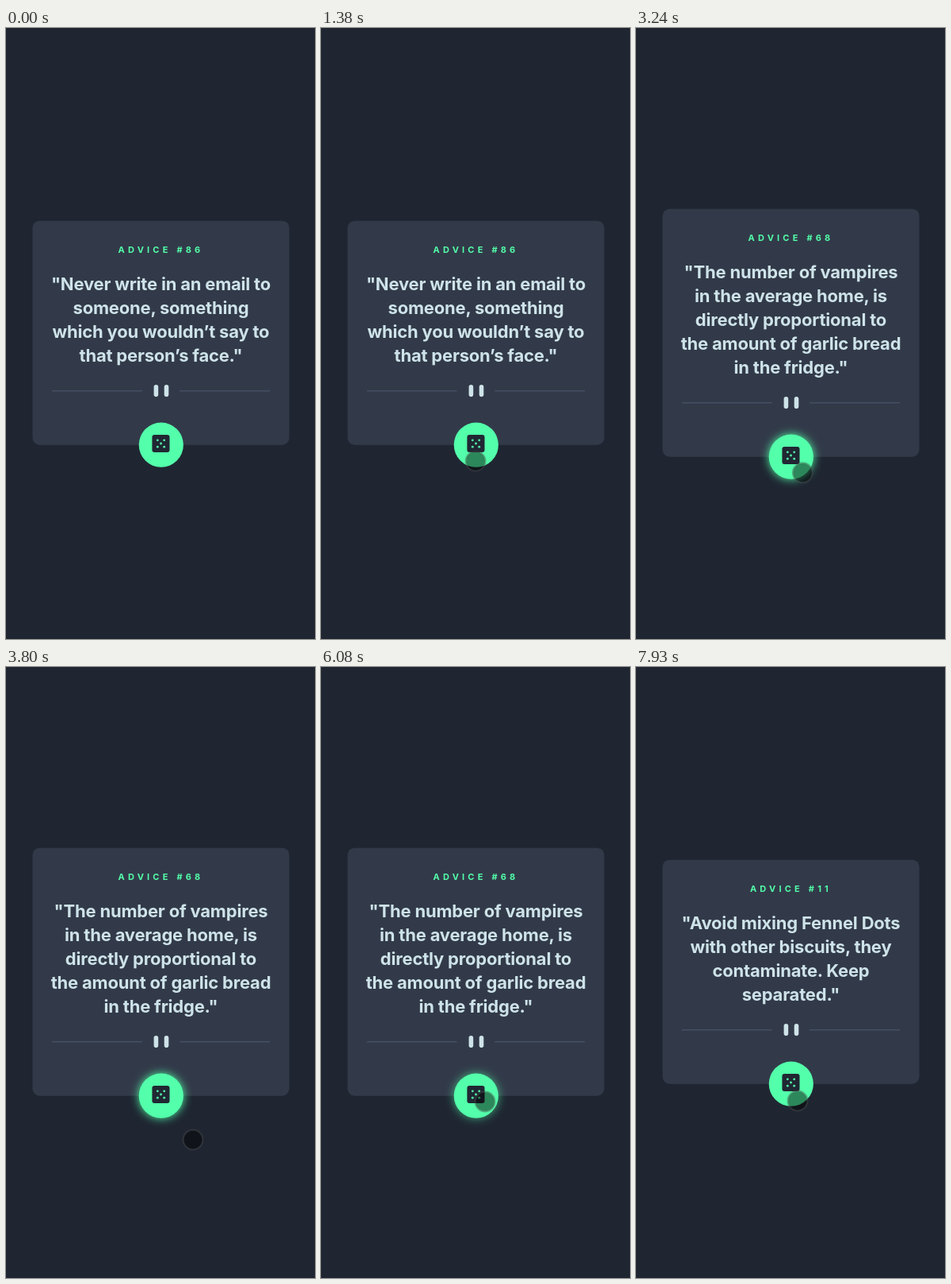
Write an HTML page that moves like this. It is 390 by 769 pixels and loops after 7990 ms.

```html
<!DOCTYPE html>
<html lang="en">
<head>
<meta charset="utf-8">
<title>Advice generator</title>
<style>
  html, body { margin: 0; width: 100%; height: 100%; overflow: hidden; background: #1f2632; }
  svg { display: block; width: 100%; height: 100%; }
  text { font-family: Inter, "Open Sans", sans-serif; font-weight: 700; text-anchor: middle; }
  #label { font-size: 11px; letter-spacing: 4.2px; fill: #53ffaa; }
  #quote { font-size: 22px; letter-spacing: -.2px; fill: #cee3e9; }
  #glow { filter: blur(6px); }
</style>
</head>
<body>
<svg viewBox="0 0 390 769">
  <rect id="card" x="33.5" width="324" rx="9" fill="#323a49"/>
  <g id="top">
    <text id="label" x="195.5" y="283"></text>
    <g id="quote"></g>
  </g>
  <g id="bottom">
    <path d="M58 456.8H171.7M219.2 456.8H333" stroke="#4f5d74" stroke-width=".93"/>
    <g fill="#cee3e9">
      <rect x="186.6" y="449" width="5.6" height="15" rx="2.8"/>
      <rect x="199.7" y="449" width="5.6" height="15" rx="2.8"/>
    </g>
    <g fill="#53ffaa">
      <circle id="glow" cx="195.8" cy="524.7" r="28"/>
      <circle cx="195.8" cy="524.7" r="28.1"/>
    </g>
    <rect x="184.4" y="512" width="22.1" height="22" rx="3" fill="#202733"/>
    <g id="pips" fill="#53ffaa"></g>
  </g>
  <g id="cursor">
    <circle id="disc" r="11.8"/>
    <circle r="12.4" fill="none" stroke="#484848" stroke-opacity=".45" stroke-width="2"/>
  </g>
</svg>
<script>
const LOOP = 7990, ENTER = 520, GLOW_FADE = 550;
const $ = id => document.getElementById(id);
const clamp = v => Math.min(1, Math.max(0, v));
const easeOut = p => 1 - (1 - p) ** 2.4;

const advices = [
  { from: 0, id: 86, lines: ['"Never write in an email to', 'someone, something', 'which you wouldn’t say to', 'that person’s face."'] },
  { from: 3100, id: 68, lines: ['"The number of vampires', 'in the average home, is', 'directly proportional to', 'the amount of garlic bread', 'in the fridge."'] },
  { from: 6350, id: 11, lines: ['"Avoid mixing Fennel Dots', 'with other biscuits, they', 'contaminate. Keep', 'separated."'] }
];

const entry = { x: 358, y: 768 };
const moves = [
  { from: ENTER, to: 1250, x: 200, y: 562 },
  { from: 1250, to: 1650, x: 192, y: 534.5 },
  { from: 3100, to: 3800, x: 236, y: 595 },
  { from: 4700, to: 5270, x: 207, y: 547 },
  { from: 6330, to: 6840, x: 234, y: 570 },
  { from: 7550, to: 7930, x: 204, y: 546 }
];

// Taps alternate between the button (glow on) and beside it (glow off).
const taps = [
  { down: 2050, up: 2250 }, { down: 4190, up: 4390 },
  { down: 5470, up: 5730 }, { down: 7100, up: 7300 }
];

function cursorAt(t) {
  return moves.reduce((pos, { from, to, x, y }) => {
    const p = easeOut(clamp((t - from) / (to - from)));
    return { x: pos.x + (x - pos.x) * p, y: pos.y + (y - pos.y) * p };
  }, entry);
}

function glowAt(t) {
  return taps.reduce((sum, { up }, i) =>
    sum + (i % 2 ? -1 : 1) * clamp((t - up) / GLOW_FADE), 0);
}

const PIP = 4.2;
$('pips').innerHTML = [[0, 0], [-1, -1], [1, -1], [-1, 1], [1, 1]]
  .map(([x, y]) => `<circle cx="${195.5 + x * PIP}" cy="${523 + y * PIP}" r="1.4"/>`).join('');

let shown;
function showAdvice(advice) {
  if (advice === shown) return;
  shown = advice;
  const shift = (advice.lines.length - 4) * 15;
  $('label').textContent = `ADVICE #${advice.id}`;
  $('quote').innerHTML = advice.lines
    .map((line, i) => `<text x="195.5" y="${330 + i * 30}">${line}</text>`).join('');
  $('card').setAttribute('y', 242.7 - shift);
  $('card').setAttribute('height', 282 + 2 * shift);
  $('top').setAttribute('transform', `translate(0 ${-shift})`);
  $('bottom').setAttribute('transform', `translate(0 ${shift})`);
}

function draw(t) {
  const { x, y } = cursorAt(t);
  const pressed = taps.some(({ down, up }) => t >= down && t < up);
  showAdvice(advices.findLast(a => t >= a.from));
  $('glow').setAttribute('opacity', glowAt(t));
  $('cursor').setAttribute('visibility', t < ENTER ? 'hidden' : 'visible');
  $('cursor').setAttribute('transform', `translate(${x} ${y})`);
  $('disc').setAttribute('fill-opacity', pressed ? .65 : .47);
}

const start = performance.now();
function frame() {
  draw((performance.now() - start) % LOOP);
  requestAnimationFrame(frame);
}
frame();
</script>
</body>
</html>
```
